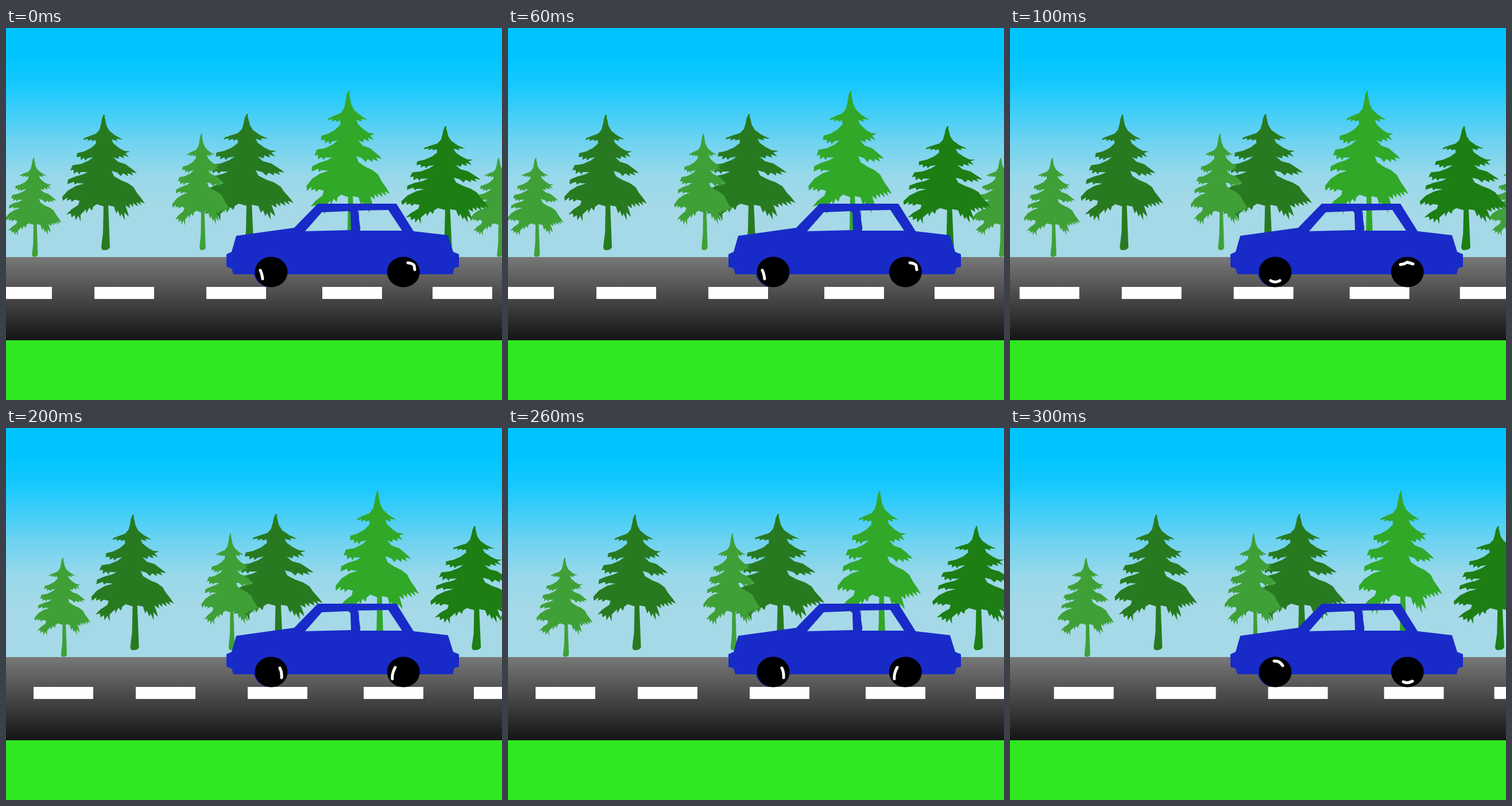
These frames come from a looping animation (864x648 px, 0.4 s). An HTML page:

```html
<!DOCTYPE html>
<html lang="en">
<head>
<meta charset="utf-8">
<title>Blue car on a forest road</title>
<style>
html, body { margin: 0; width: 100%; height: 100%; overflow: hidden; }
svg { display: block; width: 100%; height: 100%; }
</style>
</head>
<body>
<svg viewBox="0 0 864 648">
  <defs>
    <linearGradient id="sky" gradientUnits="userSpaceOnUse" x1="0" y1="0" x2="0" y2="400">
      <stop offset=".12" stop-color="#00c4ff"/>
      <stop offset=".25" stop-color="#16c9fe"/>
      <stop offset=".5" stop-color="#70d3f0"/>
      <stop offset=".64" stop-color="#97d8ea"/>
      <stop offset=".77" stop-color="#a5d9e7"/>
    </linearGradient>
    <linearGradient id="asphalt" x2="0" y2="1">
      <stop stop-color="#787878"/>
      <stop offset="1" stop-color="#141414"/>
    </linearGradient>
    <g id="tree">
      <!-- right boughs -->
      <path d="M0 0L3 9 5 19 10 28 20 36 33 43 22 42 24 46 14 43 17 50 27 58 36 63 46 64 38 67
        44 74 34 70 36 76 27 72 26 77 17 74 25 82 38 86 46 92 54 98 58 102 48 100 52 106 42 102
        42 107 34 102 30 107 24 101 14 98 18 107 30 114 42 119 52 126 58 136 66 146 72 155 63 151
        66 158 57 152 60 160 51 154 52 161 45 155 46 163 38 158 42 170 44 178 36 170 37 184 31 172
        29 178 25 167 22 172 18 160 8 158 0 160Z"/>
      <!-- left boughs -->
      <path d="M0 0L-3 7 -4 14 -7 26 -13 33 -24 37 -34 41 -35 44 -27 42 -28 46 -21 43 -20 46 -14 44
        -13 50 -22 58 -34 64 -46 67 -47 74 -40 73 -40 79 -34 75 -32 80 -28 76 -18 74 -26 80 -40 86
        -54 88 -58 97 -52 96 -52 103 -46 99 -42 104 -40 100 -28 100 -36 104 -50 108 -62 113 -63 121
        -52 117 -50 122 -46 119 -34 120 -48 124 -62 132 -72 143 -71 150 -63 144 -64 150 -57 147
        -56 152 -50 148 -42 150 -44 157 -56 165 -65 174 -57 172 -56 179 -50 175 -49 184 -44 176
        -40 186 -40 174 -31 165 -30 172 -25 162 -20 167 -18 160 -12 156 1 160 2 0Z"/>
      <path d="M0 155H8L11 231Q9 236 1 236 -4 236 -4 230L-1 205Z"/>
    </g>
  </defs>

  <path fill="url(#sky)" d="M0 0H864V400H0Z"/>
  <g id="forest"></g>
  <path fill="url(#asphalt)" d="M0 399H864V545H0Z"/>
  <path fill="#30e822" d="M0 544H864V648H0Z"/>
  <g id="dashes" fill="#fffdff"></g>

  <g fill="#182bc8">
    <path fill-rule="evenodd" d="M401 362L502 348 543 306H680L710 354 770 361 779 390 789 394V416L781 418
      778 429H396L393 419 384 416V394L393 390Z
      M550 321L597 319 600 322 601 352 521 354Z M613 318L666 317 690 353H617Z"/>
    <path d="M431 428Q437 447 455 451L462 428Z"/>
  </g>
  <path d="M614 319Q614 336 617 350" fill="none" stroke="#182bc8"/>
  <ellipse cx="462" cy="425" rx="28.5" ry="26.5"/>
  <ellipse cx="692.3" cy="425" rx="28.5" ry="26.5"/>
  <path id="glints" fill="none" stroke="#fff" stroke-width="5" stroke-linecap="round" stroke-linejoin="round"/>
</svg>
<script>
const find = id => document.getElementById(id);

// apex x, apex y, horizontal scale, vertical scale, colour
const trees = [
  [48, 226, .68, .732, '#3fa037'],
  [858, 226, .68, .732, '#3fa037'],
  [170, 151, 1, 1, '#287a20'],
  [419, 150, 1.14, 1, '#287a20'],
  [340, 184, .7, .86, '#3fa037'],
  [596, 110, 1.01, 1.156, '#31a828'],
  [765, 171, 1.06, .915, '#1d7e14']
];
find('forest').innerHTML = trees.map(([x, y, sx, sy, fill]) =>
  `<use href="#tree" fill="${fill}" transform="translate(${x} ${y}) scale(${sx} ${sy})"/>`).join('');

find('dashes').innerHTML = [-24, 154, 349, 551, 743].map(x =>
  `<rect x="${x}" y="451" width="104" height="21"/>`).join('');

// Uneven scroll distances and wheel reflections, one pose per 100 ms
const poses = [
  { forest: 0, road: 0, glints: 'M443 422Q446 428 447 437M700 409Q709 410 711 414L712 421' },
  { forest: 25.3, road: 40.7, glints: 'M454 440Q462 445 470 440M680 412L686 411 692 408 702 411' },
  { forest: 50.6, road: 72, glints: 'M477 418Q481 426 480 435M678 417Q672 428 673 437' },
  { forest: 84.3, road: 100.6, glints: 'M460 406Q470 405 475 414M685 442Q692 446 701 441' }
];

function draw() {
  const pose = poses[Math.floor(performance.now() / 100) % poses.length];
  find('forest').setAttribute('transform', `translate(${pose.forest})`);
  find('dashes').setAttribute('transform', `translate(${pose.road})`);
  find('glints').setAttribute('d', pose.glints);
  requestAnimationFrame(draw);
}
draw();
</script>
</body>
</html>
```
